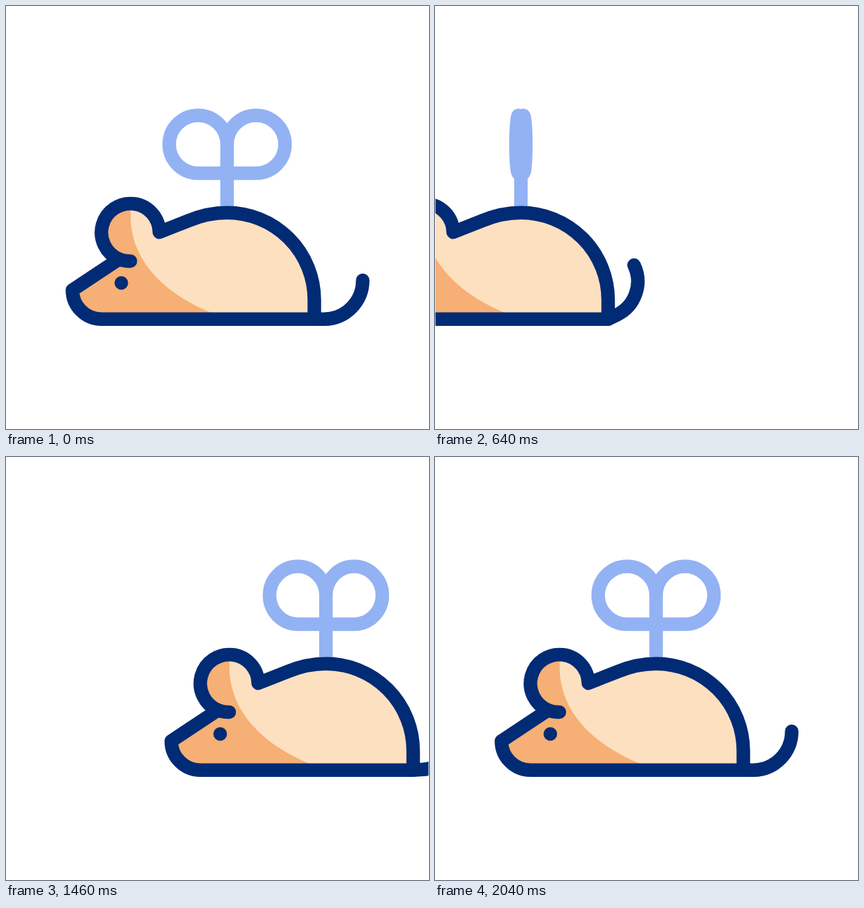
Recreate the animation shown at these times as an HTML page. Size 640 by 640 pixels, loop 2400 ms.

```html
<!DOCTYPE html>
<html lang="en">
<head>
<meta charset="utf-8">
<title>Wind-up mouse</title>
<style>
  html, body { margin: 0; width: 100%; height: 100%; overflow: hidden; background: #fff; }
  svg { display: block; width: 100%; height: 100%; clip-path: inset(0 .7px); }
  .line { fill: none; stroke: #022b75; stroke-width: 20.5; stroke-linecap: round; stroke-linejoin: round; }
  #key { fill: none; stroke: #93b2f4; stroke-width: 20.5; }
</style>
</head>
<body>
<svg viewBox="0 0 640 640">
  <defs>
    <path id="shape" d="M466.5 473.7V444.5A132 132 0 0 0 334.5 312.7C314 312.7 295 317 277 324.5L232 342.3A43.8 43.8 0 1 0 171 383L100.5 429.7A44 44 0 0 0 144.5 473.7Z"/>
    <clipPath id="inside"><use href="#shape"/></clipPath>
  </defs>
  <g id="mouse">
    <path id="key"/>
    <use href="#shape" fill="#fde0bf"/>
    <path clip-path="url(#inside)" fill="#f6af74" d="M80 290H188.5V318C188.5 385 240 442 336 473.7V490H80Z"/>
    <path id="tail" class="line"/>
    <use href="#shape" class="line"/>
    <path class="line" d="M171 383A43.8 43.8 0 0 0 188.2 386"/>
    <circle cx="174.5" cy="419" r="10.3" fill="#022b75"/>
  </g>
</svg>
<script>
  const LOOP = 2400;
  const [mouse, key, tail] = ["mouse", "key", "tail"].map(id => document.getElementById(id));

  const smooth = p => p * p * (3 - 2 * p);
  const sine = p => (1 - Math.cos(Math.PI * p)) / 2;

  // Eases in, then settles a little sooner than a symmetric curve.
  function settle(p) {
    let lo = 0, hi = 1;
    for (let i = 0; i < 24; i++) {
      const s = (lo + hi) / 2, r = 1 - s;
      if (r * r * s + 1.44 * r * s * s + s * s * s < p) lo = s; else hi = s;
    }
    return smooth(lo);
  }

  // Steps: [start, end, from, to, ease]
  const slide = [
    [0, 379, 0, 61.5, smooth],
    [379, 957, 61.5, -557, smooth],
    [1031, 1681, 562, 0, smooth]
  ];
  const curl = [
    [470, 726, 0, 1, smooth],
    [1375, 1780, 0, 1, smooth],
    [1780, 2040, 1, 0, smooth]
  ];
  const spin = [
    [0, 1328, 0, 180, sine],
    [1357, 2040, 180, 360, settle]
  ];

  function at(steps, t) {
    let value = steps[0][2];
    for (const [start, end, from, to, ease] of steps) {
      if (t < start) break;
      value = from + (to - from) * ease(Math.min(1, (t - start) / (end - start)));
    }
    return value;
  }

  // Each point moves straight from the resting tail to the raised one.
  const RAISE = 34.3 * Math.PI / 180;
  function tailPath(k) {
    const a = 1 - k + k * Math.cos(RAISE), b = k * Math.sin(RAISE);
    const pt = (x, y) => `${466.5 + a * x + b * y} ${473.7 - b * x + a * y}`;
    return `M${pt(0, 0)}L${pt(15, 0)}C${pt(47.2, 0)} ${pt(73.2, -26.3)} ${pt(73.2, -58.7)}`;
  }

  function keyPath(scale) {
    const c = 334.5, r = Math.max(0.05, 43.8 * Math.abs(scale));
    const arc = (x, y) => `A${r} 43.8 0 0 1 ${c + x * r} ${y}`;
    return `M${c} 313V209.3` + arc(1, 165.5) + arc(2, 209.3) + arc(1, 253.1) +
      `H${c - r}` + arc(-2, 209.3) + arc(-1, 165.5) + arc(0, 209.3);
  }

  function draw(t) {
    mouse.setAttribute("transform", `translate(${at(slide, t)} 0)`);
    tail.setAttribute("d", tailPath(at(curl, t)));
    key.setAttribute("d", keyPath(Math.cos(at(spin, t) * Math.PI / 180)));
  }

  const begin = performance.now();
  function tick() {
    draw((performance.now() - begin) % LOOP);
    requestAnimationFrame(tick);
  }
  draw(0);
  requestAnimationFrame(tick);
</script>
</body>
</html>
```
